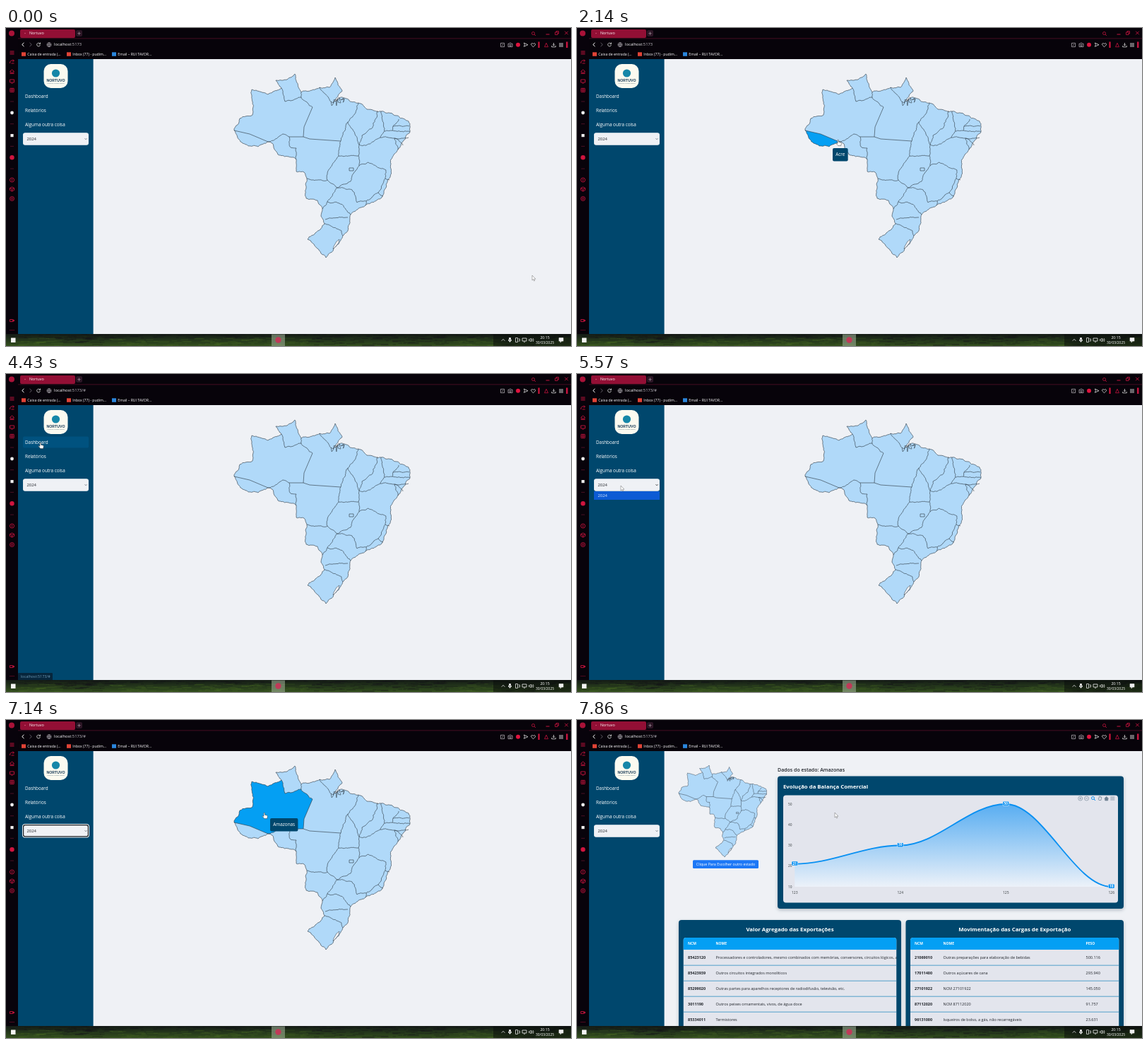
Write an HTML page with a canvas that moves like this. It is 800 px wide and 450 px high and loops after 8 s.

```html
<!DOCTYPE html>
<html lang="pt-BR">
<head>
<meta charset="utf-8">
<title>Painel</title>
<style>
  html, body { margin: 0; width: 100%; height: 100%; overflow: hidden; background: #08040a; }
  canvas { display: block; }
</style>
</head>
<body>
<canvas id="stage" width="800" height="450"></canvas>
<script>
const ctx = document.getElementById('stage').getContext('2d');
const LOOP = 8000, STEP = 1000 / 7;
const RED = '#c4143e', NAVY = '#00476d', INK = '#20242a', PANEL = '#e3e5ed', SKY = '#049ff3';
const SANS = '"Open Sans", "Noto Sans", sans-serif';

const noise = (x, y = 0, i = 0) => {
  const v = Math.sin(x * 12.9898 + y * 78.233 + i * 37.7) * 43758.5453;
  return v - Math.floor(v);
};
const clamp = v => Math.max(0, Math.min(1, v));
const smooth = v => v * v * (3 - 2 * v);

// Key points of the borders; midpoint displacement adds the ragged detail.
const ARCS = {
  amWest: '323 145 331 128 349 123 348 87 371 94 390 85',
  rrTop: '390 85 382 74 398 73 409 65 418 91',
  paTop: '418 91 444 84',
  apCoast: '444 84 458 84 466 70 476 89 463 106',
  paCoast: '463 106 474 98 499 106',
  coast: '499 106 511 115 531 118 548 122 570 132 572 147 555 172 545 186 544 211 532 240 509 251 488 264 484 287 468 308 453 325 427 299',
  south: '427 299 451 277 446 266 448 256 441 244 425 241 426 213 422 204 411 203 411 186',
  roSouth: '411 186 385 179 377 163 371 161',
  acSouth: '371 161 357 168 344 167 334 162 323 145',
  amAc: '323 145 345 150 371 161',
  amRo: '371 161 392 150 401 154',
  amMt: '401 154 421 154',
  amPa: '421 154 422 140 434 112',
  amTop: '434 112 418 98',
  amRr: '418 98 403 103 395 104 390 85',
  rrPa: '418 91 418 98',
  paMt: '421 154 430 157 474 160',
  roMt: '401 154 402 168 411 170 411 186',
  paAp: '444 84 463 106',
  paTo: '474 160 480 145 484 133',
  paMa: '484 133 497 115 499 106'
};
const INNER = `474 160 471 181 455 207 455 215 469 226/426 213 455 215/484 133 494 150 500 165 499 181 500 195
  /471 181 499 181/500 195 492 206 488 217 469 226/526 117 519 141 504 152 500 165/531 118 536 146 530 155
  /530 155 510 166 500 165/556 129 548 139 547 145/548 139 571 139/536 146 547 145 572 147/530 155 550 156 570 155
  /562 166 550 156 555 172/500 195 513 190 538 201 537 213 543 215/537 213 531 228 527 233 534 238
  /527 233 510 245 509 251/510 245 497 247 490 229 469 226 455 246 448 256/455 246 472 248 488 264
  /452 271 484 268/451 277 475 287 477 294`.split('/');
const STRAIGHT = ['amAc', 'amMt', 'amPa', 'paMt'];
const REGIONS = {
  Brasil: 'amWest rrTop paTop apCoast paCoast coast south roSouth acSouth',
  Acre: 'amAc acSouth',
  Amazonas: 'amWest -amRr -amTop -amPa -amMt -amRo -amAc',
  Roraima: 'rrTop rrPa amRr',
  Rondônia: 'amRo roMt roSouth',
  Pará: 'paTop paAp paCoast -paMa -paTo -paMt amPa amTop -rrPa'
};

function split(a, b, out) {
  const dx = b[0] - a[0], dy = b[1] - a[1], len = Math.hypot(dx, dy);
  if (len > 2.6) {
    const d = (noise(a[0] + b[0], a[1] - b[1]) - .5) * Math.min(.3, 2.6 / len);
    const mid = [(a[0] + b[0]) / 2 - dy * d, (a[1] + b[1]) / 2 + dx * d];
    split(a, mid, out);
    split(mid, b, out);
  } else out.push(b);
}
function arc(str, straight) {
  const v = str.trim().split(/\s+/).map(Number), pts = [];
  for (let i = 0; i < v.length; i += 2) pts.push([v[i], v[i + 1]]);
  if (straight) return pts;
  const out = [pts[0]];
  for (let i = 1; i < pts.length; i++) split(pts[i - 1], pts[i], out);
  return out;
}
const arcs = {};
for (const k in ARCS) arcs[k] = arc(ARCS[k], STRAIGHT.includes(k));

const trace = (path, pts) => pts.forEach((p, i) => i ? path.lineTo(...p) : path.moveTo(...p));
const borders = new Path2D();
[...Object.values(arcs), ...INNER.map(s => arc(s))].forEach(pts => trace(borders, pts));
borders.rect(486, 198, 6, 4);
const delta = new Path2D();
trace(delta, Array.from({ length: 22 }, (_, i) =>
  [460 + i * .75 + noise(i, 2) * 6, 107 - i * .3 + (noise(i, 4) - .5) * 10]));
const regions = Object.entries(REGIONS).map(([name, keys]) => {
  const path = new Path2D();
  trace(path, keys.split(' ').flatMap(k => k[0] === '-' ? [...arcs[k.slice(1)]].reverse() : arcs[k]));
  path.closePath();
  return { name, path };
});
const [country, ...states] = regions;

// Pointer stops: time, x, y
const MOVES = [
  [0, 745, 350], [280, 745, 350], [1300, 470, 140], [2000, 353, 162], [2140, 369, 158], [2430, 380, 140],
  [2714, 339, 131], [3000, 264, 147], [4000, 48, 97], [4860, 48, 97], [5290, 62, 158],
  [6200, 62, 158], [6860, 365, 131], [8000, 365, 131]
];
function pointer(t) {
  t = Math.max(0, t);
  const i = Math.max(1, MOVES.findIndex(m => m[0] >= t));
  const [t0, x0, y0] = MOVES[i - 1], [t1, x1, y1] = MOVES[i];
  const p = smooth(clamp((t - t0) / (t1 - t0)));
  return { x: x0 + (x1 - x0) * p, y: y0 + (y1 - y0) * p };
}
const stateAt = p => states.find(s => ctx.isPointInPath(s.path, p.x, p.y));

function text(s, x, y, size, color = '#fff', align = 'left', weight = 400, family = SANS) {
  ctx.font = `${weight} ${size}px ${family}`;
  ctx.textAlign = align;
  ctx.textBaseline = 'middle';
  ctx.fillStyle = color;
  ctx.fillText(s, x, y);
}
function box(x, y, w, h, color, r = 0) {
  ctx.fillStyle = color;
  ctx.beginPath();
  ctx.roundRect(x, y, w, h, r);
  ctx.fill();
}
function dot(x, y, r, color) {
  ctx.fillStyle = color;
  ctx.beginPath();
  ctx.arc(x, y, r, 0, 7);
  ctx.fill();
}
function icon(d, x, y, color, width = .8, fill) {
  ctx.save();
  ctx.translate(x, y);
  const p = new Path2D(d);
  if (fill) { ctx.fillStyle = fill; ctx.fill(p); }
  ctx.strokeStyle = color;
  ctx.lineWidth = width;
  ctx.stroke(p);
  ctx.restore();
}
const I = {
  ring: 'M3 0A3 3 0 1 1-3 0A3 3 0 1 1 3 0',
  square: 'M-2.6-2.6h5.2v5.2h-5.2z',
  lens: 'M1.5-.5A2 2 0 1 1-2.5-.5A2 2 0 1 1 1.5-.5M1 1l2 2',
  lines: 'M-3-2h6M-3 0h6M-3 2h6',
  dash: 'M-2.5 0h5',
  cross: 'M-2.3-2.3l4.6 4.6M2.3-2.3l-4.6 4.6',
  plus: 'M-2.2 0h4.4M0-2.2v4.4',
  up: 'M-2.3 1.2L0-1.2 2.3 1.2',
  down: 'M-1.5-.8L0 .8 1.5-.8',
  heart: 'M0 2.8L-2.8 0C-3.6-2.6-.7-3.2 0-1.3C.7-3.2 3.6-2.6 2.8 0z',
  send: 'M-2.6-2.6L3 0-2.6 2.6-1.6 0z',
  save: 'M0-3v4M-1.6-.6L0 1 1.6-.6M-2.8 1v1.8h5.6V1',
  cube: 'M0-3l3 1.5v3L0 3-3 1.5v-3zM-3-1.5L0 0 3-1.5M0 0v3',
  person: 'M-2.5 2.7L0-2.8 2.5 2.7z',
  house: 'M-3 0L0-2.8 3 0M-2 0v2.6h4V0',
  speaker: 'M-3-1h1.5L0-2.5v5L-1.5 1H-3zM1.2-1.5q1.2 1.5 0 3M2.5-2.5q2 2.5 0 5',
  mic: 'M-1-3h2v4h-2zM-2-.5q0 2.6 2 2.6t2-2.6M0 2v1.2',
  screen: 'M-3-2h6v4h-6zM-1 3.2h2'
};

function browser(t) {
  box(0, 0, 800, 44, '#07030a');
  box(0, 0, 17, 434, '#08030b');
  box(17, 14.5, 783, .8, '#591029');
  dot(8, 7.5, 4, '#a91238');
  box(20, 2, 78, 12, '#930f35', 2);
  dot(27, 7.5, .8, '#d4577a');
  text('Nortuvo', 33, 8, 5.4);
  box(99, 3, 9, 9, '#2c1626', 2);
  icon(I.plus, 103.5, 7.7, '#b9a9b4', .6);
  icon(I.lens, 747, 8, RED);
  icon(I.dash, 767, 9, RED, 1);
  icon('M-2.5-1h3.5v3.5h-3.5zM-1-1v-1.5h3.5v3.5H1', 780, 7, RED);
  icon(I.cross, 793.5, 7, RED, .9);

  icon('M1.5-2.6L-1.3 0 1.5 2.6', 24, 23.5, '#fff', 1);
  icon('M-1.5-2.6L1.3 0-1.5 2.6', 35, 23.5, '#77727a');
  icon('M2.2-1A2.4 2.4 0 1 0 2.4.6M2.5-3v2.2H.5', 46, 23.5, '#ddd');
  icon(I.ring + 'M-3 0h6M0-3q-2.4 3 0 6q2.4-3 0-6', 61, 23.7, '#c9c5cb', .6);
  text('localhost', 68, 23.7, 5.8);
  const w = ctx.measureText('localhost').width;
  text(t >= 4140 ? ':5173/#' : ':5173', 68 + w, 23.7, 5.8, '#c6c2c9');

  icon(I.square + 'M-1 1L1-1', 703, 24, '#c9c5cb', .7);
  icon('M-3-1.8h1.5l.8-1h1.4l.8 1H3v4.4h-6zM1.2.4A1.2 1.2 0 1 1-1.2.4A1.2 1.2 0 1 1 1.2.4', 714, 24, '#c9c5cb', .7);
  dot(725, 23.7, 3, '#e0143f');
  icon(I.send, 736, 23.7, '#ddd');
  icon(I.heart, 746.5, 24, '#ddd');
  box(753.5, 19.5, 2, 8.5, '#e0143f');
  icon(I.person, 765, 24, RED);
  icon(I.save, 775.5, 24, '#ddd');
  icon(I.lines, 786, 24, '#ddd', .9);
  box(793, 19.5, 2.5, 8.5, RED);

  [['Caixa de entrada (...', 22, '#e04336'], ['Inbox (77) - pudim...', 86, '#e04336'],
    ['Email – RUI TAVOR...', 150, '#2a86dc']].forEach(([s, x, color]) => {
    box(x, 34.3, 6, 5.5, color);
    text(s, x + 8.3, 37.3, 5.15);
  });

  const side = [
    [I.lines, 35], ['M-3 2q0-5 5-4M1-3l2 1-2 2M-1 2h4', 48], ['M-3 2.5h6M-2.5 1v-2l2.5-2 2.5 2v2z', 62],
    [I.screen, 75], [I.square + 'M-3 0h6M0-2.5v5', 88], [I.ring + 'M0-1.5V1.5', 215], [I.cube, 228],
    [I.ring + 'M1.2 0A1.2 1.2 0 1 1-1.2 0A1.2 1.2 0 1 1 1.2 0', 241.5], ['M-3-1.5h4v3h-4zM2-1.5v3M3-1v2', 414]
  ];
  side.forEach(([d, y]) => icon(d, 8.5, y, RED, .9));
  for (let y = 104; y < 200; y += 31.7) icon(I.dash, 8.5, y, '#5c1329');
  dot(8.5, 120, 2.4, '#eee');
  box(6.4, 150, 4.2, 4.2, '#eee');
  dot(8.5, 183.3, 3.2, '#d0143e');
  for (let x = 6; x < 12; x += 2.5) dot(x, 427.5, .6, RED);
}

// Grassy wallpaper strip showing through the bar
function taskbar() {
  const g = ctx.createLinearGradient(0, 433, 0, 450);
  g.addColorStop(0, '#141b15');
  g.addColorStop(.45, '#22331b');
  g.addColorStop(1, '#334f1d');
  box(0, 433, 800, 17, g);
  ctx.save();
  ctx.beginPath();
  ctx.rect(0, 433, 800, 17);
  ctx.clip();
  for (let i = 0; i < 420; i++) {
    const x = noise(i, 3, 1) * 800, y = 433 + noise(i, 5, 2) * 17;
    const dark = noise(Math.floor(x / 70), 8) > .55 || y < 438;
    ctx.fillStyle = dark ? 'rgba(18,14,24,.3)' : 'rgba(84,118,40,.22)';
    ctx.fillRect(x, y, 3 + noise(i, 7, 3) * 16, 1.2);
  }
  ctx.restore();
  box(690, 433, 110, 17, 'rgba(10,14,12,.55)');
  box(7, 438.5, 6.5, 6.5, '#f4f4f4');
  box(376, 433.5, 19, 16.5, 'rgba(165,180,155,.55)');
  dot(385.5, 441.5, 4.2, '#c03a58');
  icon(I.up, 704, 441.5, '#eee');
  icon(I.mic, 713.5, 441.5, '#eee', .8, '#eee');
  icon('M-2.5-3h3v6h-3zM1.5-1.5h2v3h-2', 724, 441.5, '#ddd');
  icon(I.screen, 734, 441, '#eee');
  icon(I.speaker, 743.5, 441.5, '#eee', .7);
  text('20:15', 763, 438.2, 5.2, '#fff', 'center');
  text('30/03/2025', 763, 445.6, 4.9, '#fff', 'center');
  icon('M-3-3h6v4.6h-2.5L-1 3.4V1.6h-2z', 786, 441.5, '#eee', .6, '#eee');
}

const LINKS = ['Dashboard', 'Relatórios', 'Alguma outra coisa'].map((name, i) => ({ name, y: 96.5 + i * 20 }));
const linkAt = p => LINKS.find(l => p.x > 24 && p.x < 117 && Math.abs(p.y - l.y) < 8);

function sidebar(link, open, focus) {
  box(17, 44, 106.6, 390, NAVY);
  box(53.5, 51, 34, 34, '#fbfaf0', 10);
  dot(70.5, 64, 5.6, '#1687a8');
  text('NORTUVO', 70.5, 74.4, 5.2, '#173a56', 'center', 700, 'Arial, "Liberation Sans", sans-serif');
  text('Comércio e dados abertos', 70.5, 78.2, 2, '#4d6a7a', 'center');
  if (link) box(24, link.y - 8, 93, 16, '#00527f', 2);
  LINKS.forEach(l => text(l.name, 27, l.y + .8, 6.35));

  if (focus) {
    box(23, 147, 95, 19.5, '#f5f8fa', 4);
    box(24, 148, 93, 17.5, '#15191e', 3);
    box(25.2, 149.2, 90.6, 15.1, '#eff1f5', 2);
  } else {
    box(24, 148.3, 93, 17.4, '#dfe4e9', 3);
    box(24.5, 148.8, 92, 16.4, '#eff1f5', 2.6);
  }
  text('2024', 29.5, 157.4, 5.9, INK);
  icon(I.down, 113, 157, open ? '#222' : '#697078');
  if (open) {
    box(24, 166, 93, 12, '#0c5bd4');
    text('2024', 29.5, 172.4, 5.9, '#dcebff');
  }
  if (link) {
    box(17, 423, 49, 10.5, '#07263c', 1);
    text('localhost:5173/#', 21, 428.2, 5.4, '#6f9bb8');
  }
}

function map(hover, lineWidth) {
  ctx.lineJoin = 'round';
  ctx.lineWidth = lineWidth;
  ctx.strokeStyle = '#34414c';
  ctx.fillStyle = '#b0d9f9';
  ctx.fill(country.path);
  if (hover) {
    ctx.fillStyle = SKY;
    ctx.fill(hover.path);
  }
  ctx.stroke(borders);
  ctx.stroke(delta);
  icon('M1-1l-4 3-4 7-1 4 4-4 4-5z', 471, 300, '#34414c', lineWidth * .8, '#eff1f5');
}

function tooltip(name, p) {
  ctx.font = `400 6.4px ${SANS}`;
  const w = ctx.measureText(name).width + 8.5, x = p.x + 9, y = p.y + 8;
  box(x, y, w, 18.5, NAVY, 2);
  text(name, x + w / 2, y + 9.8, 6.4, '#fff', 'center');
}

function card(x, y, w, h) {
  ctx.save();
  ctx.shadowColor = 'rgba(0,20,40,.25)';
  ctx.shadowBlur = 5;
  ctx.shadowOffsetY = 2;
  box(x, y, w, h, NAVY, 4);
  ctx.restore();
}

const VALUES = [21, 30, 50, 10];
function chart(rise) {
  card(284, 79.5, 490, 187.5);
  text('Evolução da Balança Comercial', 292, 94.5, 7.8, '#fff', 'left', 700);
  box(292, 106.5, 474, 152, PANEL, 4);
  const yOf = v => 236 - (v - 10) * 2.925;
  for (let v = 10; v <= 50; v += 10) text(v, 304.5, yOf(v) + .3, 4.8, '#373d3f', 'right');
  const pts = VALUES.map((v, i) => [308.3 + i * 149.5, 236 - (236 - yOf(v)) * rise]);
  pts.forEach(([x], i) => text(123 + i, x, 244.5, 5, '#373d3f', 'center'));

  const curve = () => {
    ctx.beginPath();
    ctx.moveTo(...pts[0]);
    for (let i = 1; i < pts.length; i++) {
      const [a, b] = [pts[i - 1], pts[i]], d = (b[0] - a[0]) * .35;
      ctx.bezierCurveTo(a[0] + d, a[1], b[0] - d, b[1], ...b);
    }
  };
  const g = ctx.createLinearGradient(0, 236 - 117 * rise, 0, 236.1);
  g.addColorStop(0, 'rgba(30,150,243,.7)');
  g.addColorStop(1, 'rgba(240,246,253,.75)');
  curve();
  ctx.lineTo(pts[3][0], 236);
  ctx.lineTo(pts[0][0], 236);
  ctx.fillStyle = g;
  ctx.fill();
  curve();
  ctx.strokeStyle = '#0990f2';
  ctx.lineWidth = 1.8;
  ctx.stroke();
  if (rise >= 1) pts.forEach(([x, y], i) => {
    box(x - 4.5, y - 4, 9, 6.4, '#d9ecfb', 1);
    box(x - 4, y - 3.5, 8, 5.4, '#0990f2', .8);
    text(VALUES[i], x, y - .5, 4.7, '#fff', 'center', 700);
  });
  const gray = '#6e8192';
  icon(I.ring + 'M-1.5 0h3M0-1.5v3', 712.7, 111, gray, .6);
  icon(I.ring + 'M-1.5 0h3', 721.5, 111, gray, .6);
  icon(I.lens, 731, 111, '#0990f2', 1);
  icon('M-2 0l1 2.5h3l.8-4-1 .5v-1.5l-1 .2-.4-.8-1 .3-.2 2.6z', 740, 111, gray, .7);
  icon(I.house, 749.7, 111.3, gray, .8, gray);
  icon(I.lines, 758.3, 111, gray, .7);
}

function table(x, w, title, cols, rows) {
  card(x, 283, w, 170);
  text(title, x + w / 2, 296.5, 7.8, '#fff', 'center', 700);
  const px = x + 6.5, pw = w - 13;
  ctx.save();
  ctx.beginPath();
  ctx.roundRect(px, 308, pw, 150, 4);
  ctx.clip();
  box(px, 308, pw, 150, PANEL);
  box(px, 308, pw, 17, SKY);
  cols.forEach(([s, cx]) => text(s, cx, 317, 5, '#fff', 'left', 700));
  rows.forEach((row, i) => {
    const y = 336 + i * 22;
    row.forEach((s, c) => text(s, cols[c][1], y + .2, 5.5, INK, 'left', c ? 400 : 700));
    box(px, y + 10.8, pw, .8, '#2387bd');
  });
  ctx.restore();
}

function dashboard(rise) {
  ctx.save();
  ctx.translate(-17.5, 31.5);
  ctx.scale(.5, .5);
  map(null, 1);
  ctx.restore();
  box(164, 198.3, 93, 11.8, '#1d78f6', 1.5);
  text('Clique Para Escolher outro estado', 210.5, 204.4, 5.3, '#fff', 'center');
  text('Dados do estado: Amazonas', 284, 71.2, 7, INK, 'left', 600);
  chart(rise);
  table(144, 315, 'Valor Agregado das Exportações', [['NCM', 157], ['NOME', 196.5]], [
    ['85423120', 'Processadores e controladores, mesmo combinados com memórias, conversores, circuitos lógicos, amplificadores'],
    ['85423939', 'Outros circuitos integrados monolíticos'],
    ['85299020', 'Outras partes para aparelhos receptores de radiodifusão, televisão, etc.'],
    ['3011190', 'Outros peixes ornamentais, vivos, de água doce'],
    ['85334011', 'Termistores']
  ]);
  table(465.5, 308.5, 'Movimentação das Cargas de Exportação', [['NCM', 478], ['NOME', 518.5], ['PESO', 720.5]], [
    ['21069010', 'Outras preparações para elaboração de bebidas', '500.116'],
    ['17011400', 'Outros açúcares de cana', '293.940'],
    ['27101922', 'NCM 27101922', '145.050'],
    ['87112020', 'NCM 87112020', '91.757'],
    ['96131000', 'Isqueiros de bolso, a gás, não recarregáveis', '23.631']
  ]);
}

function cursor(p, hand) {
  if (hand) icon('M0 .5q.9-.8 1.5.2v2.6l2.8.6q1.2.4 1 1.7l-.6 3H.8L-1.8 5.4q-.2-1 .7-.8L0 5.4z', p.x, p.y, '#333', .5, '#fff');
  else icon('M0 0v7l1.6-1.4L2.7 8l1-.5-1-2.3h2.2z', p.x, p.y, '#666', .5, '#fff');
}

function draw(t) {
  const now = pointer(t), last = pointer(t - STEP), before = pointer(t - 2 * STEP);
  const dash = t >= 7280;
  const open = t >= 5400 && t < 6100, focus = t >= 6100 && !dash;
  const link = linkAt(now);
  const hover = dash ? null : stateAt(last);

  box(0, 0, 800, 450, '#eff1f5');
  browser(t);
  sidebar(link, open, focus);
  if (dash) dashboard(smooth(clamp((t - 7200) / 500)));
  else {
    map(hover, .65);
    // The label lingers for one step after the pointer leaves.
    const named = hover || stateAt(before);
    if (named) tooltip(named.name, hover ? last : before);
  }
  taskbar();
  cursor(now, link || hover);
}

const start = performance.now();
function tick() {
  const t = (performance.now() - start) % LOOP;
  draw(Math.floor((t + 5) / STEP) % 56 * STEP);
  requestAnimationFrame(tick);
}
tick();
</script>
</body>
</html>
```
